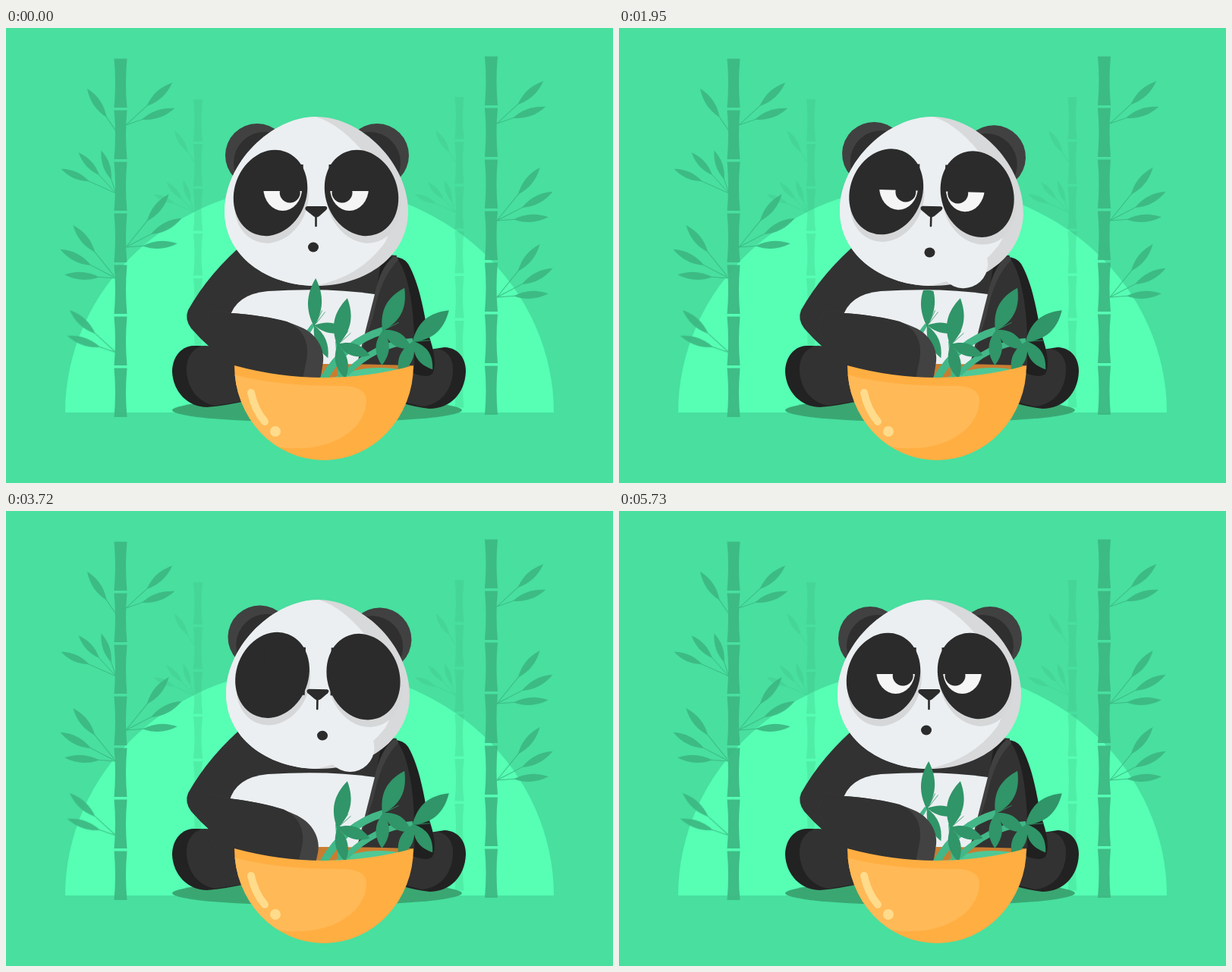
Animation of 800x600 px, one loop 5760 ms. Source, as an HTML page:

```html
<!DOCTYPE html>
<html lang="en">
<head>
<meta charset="utf-8">
<title>Panda lunch</title>
<style>
html, body { margin: 0; width: 100%; height: 100%; overflow: hidden; background: #48df9f; }
svg { display: block; width: 100vw; height: 100vh; }
</style>
</head>
<body>
<svg viewBox="0 0 800 600">
  <defs>
    <path id="skull" d="M409 117C468 117 530 178 530 242C530 300 475 340 409 340C343 340 288 300 288 242C288 178 350 117 409 117Z"/>
    <clipPath id="inSkull"><use href="#skull"/></clipPath>
    <path id="bowl" d="M301 445Q360 461 418 461Q478 461 537 445A118 125 0 0 1 301 445Z"/>
    <clipPath id="inBowl"><use href="#bowl"/></clipPath>
    <clipPath id="aboveBowl"><rect width="800" height="460"/></clipPath>
    <clipPath id="bite"><path id="biteEdge" d="M300 350H390Q405 341 422 350H480V700H300Z"/></clipPath>
    <g id="patch"><ellipse rx="47.4" ry="57.8" transform="rotate(20)"/></g>
    <g id="eye">
      <ellipse cy="211" rx="25.5" ry="30" fill="#f5f5f5"/>
      <circle cx="9.5" cy="217" r="13.5" fill="#2b2b2b"/>
      <path id="lid" fill="#2b2b2b"/>
    </g>
  </defs>

  <rect width="800" height="600" fill="#48df9f"/>
  <path d="M78 507A322 300 0 0 1 722 507Z" fill="#56ffb4"/>
  <g id="forest" fill="#3cb882"></g>
  <ellipse cx="410" cy="504" rx="191" ry="16" fill="#3aa772"/>

  <!-- feet -->
  <path d="M247 419C229 420 219 436 219 453C220 480 240 500 265 500Q290 498 320 491V430Q285 418 247 419Z" fill="#222"/>
  <path d="M262 419C245 421 237 436 238 453C240 478 255 494 275 498L320 491V425Z" fill="#323232"/>
  <path d="M578 421C597 422 606 436 606 453C605 482 585 502 558 502Q540 500 520 494V430Z" fill="#222"/>
  <path d="M568 423C583 425 590 438 589 453C588 478 572 497 548 499L520 492V435Z" fill="#323232"/>

  <!-- torso -->
  <path d="M318 280Q268 322 240 372Q235 384 244 396Q268 424 302 446H500L515 300Z" fill="#323232"/>
  <path d="M495 305Q520 297 530 311C545 337 551 375 556 402Q570 440 562 456Q552 464 525 450H470Z" fill="#202020"/>
  <path d="M486 350Q494 315 514 302C528 318 541 365 538 450H462Z" fill="#323232"/>
  <path d="M486 350Q494 315 510 302Q516 301 517 306Q494 328 484 380L462 446Z" fill="#404040"/>
  <path d="M294 384Q302 351 345 347Q425 342 486 351L462 446H330Z" fill="#ebeff1"/>

  <g id="head">
    <g fill="#414141"><circle cx="331" cy="168" r="42"/><circle cx="489" cy="168" r="42"/></g>
    <g fill="#2f2f2f"><circle cx="341" cy="178" r="41"/><circle cx="479" cy="178" r="41"/></g>
    <use href="#skull" fill="#d8d9da"/>
    <path d="M404 116Q440 124 478 172C500 200 518 255 498 285Q462 333 395 342H280V110Z" fill="#ebeff1" clip-path="url(#inSkull)"/>
    <circle id="cheek" fill="#ebeff1"/>
    <g clip-path="url(#inSkull)" fill="#d6d7d8">
      <use href="#patch" transform="translate(350 227)"/>
      <use href="#patch" transform="translate(471 227) scale(-1 1)"/>
    </g>
    <g fill="#2b2b2b">
      <use href="#patch" transform="translate(348.5 217.5)"/>
      <use href="#patch" transform="translate(468.5 217.5) scale(-1 1)"/>
      <path d="M397 235H421Q425 236 422 240L413 248Q409 251 405 248L395 240Q393 236 397 235Z"/>
      <path d="M408.5 248V261" stroke="#2b2b2b" stroke-width="2.6" stroke-linecap="round"/>
      <ellipse id="mouth"/>
    </g>
    <use href="#eye" x="364.7"/>
    <use href="#eye" transform="translate(452.5) scale(-1 1)"/>
  </g>

  <path d="M301 445Q419 441 537 445Q478 461 418 461Q360 461 301 445Z" fill="#c97d31"/>
  <g clip-path="url(#aboveBowl)"><g id="twig"><g id="sprout" clip-path="url(#bite)" fill="#309568">
    <path d="M403 390Q378 422 370 452L352 505H364L379 455Q388 420 407 392Z" fill="#43b787"/>
  </g></g></g>
  <g id="arm">
    <path d="M270 371L297 376C340 379 372 386 392 396C412 406 420 426 418 440L412 478H300Q275 425 262 395Z" fill="#424242"/>
    <path d="M270 371L297 376C325 378 352 382 370 387C394 397 400 418 396 438L388 478H300Q275 425 262 395Z" fill="#323232"/>
  </g>
  <g id="salad" fill="#309568">
    <path d="M425 465Q470 440 528 452L510 465Z" fill="#4fc896"/>
    <g fill="none" stroke="#43b787">
      <path d="M536 413Q488 416 448 456" stroke-width="8"/>
      <path d="M497 399Q446 414 418 464" stroke-width="10"/>
      <path d="M437 413L441 464" stroke-width="6"/>
    </g>
  </g>

  <use href="#bowl" fill="#ffae42"/>
  <path d="M300 457Q360 473 448 472Q476 474 475 493C473 530 430 555 385 554Q365 555 345 550Q300 515 300 457Z" fill="#ffb956" clip-path="url(#inBowl)"/>
  <path d="M323 481Q328 504 341 519" fill="none" stroke="#ffdb8c" stroke-width="10" stroke-linecap="round"/>
  <circle cx="355" cy="532" r="7" fill="#ffdb8c"/>
</svg>

<script>
const LOOP = 5760;
const $ = id => document.getElementById(id);
const add = (id, markup) => $(id).insertAdjacentHTML('beforeend', markup);
const set = (id, attrs) => {
  for (const name in attrs) $(id).setAttribute(name, attrs[name]);
};

// Pointed leaf along a ray at the given angle, between two distances
function leaf(angle, from, to, width) {
  const a = from + (to - from) * 0.35, b = from + (to - from) * 0.65, w = width * 0.67;
  return `<path transform="rotate(${angle})" d="M${from} 0C${a} ${w} ${b} ${w} ${to} 0C${b} ${-w} ${a} ${-w} ${from} 0Z"/>`;
}

// Twig on a bamboo trunk with one to three leaves; dir -1 points left
function sprig(x, y, dir, count, turn = 0, size = 1, flip = 1) {
  let parts = '';
  for (let i = 3 - count; i < 3; i++) {
    const angle = -51 + 23.5 * i, reach = 90 - 3 * i - 4 * i * i;
    parts += leaf(angle, reach - 46, reach, 10);
    parts += `<path transform="rotate(${angle})" d="M0 0H${reach - 40}" stroke="#3cb882"/>`;
  }
  return `<g transform="translate(${x} ${y}) scale(${dir * size} ${size}) rotate(${turn}) scale(1 ${flip})">${parts}</g>`;
}

function bamboo(x, top, width, step, opacity, sprigs) {
  let d = '';
  const h = step - 3.5, r = width / 2;
  for (let i = 0; i < 7; i++) {
    const y = top + i * step;
    d += `M${x - r} ${y}H${x + r}Q${x + r - 3} ${y + h / 2} ${x + r} ${y + h}H${x - r}Q${x - r + 3} ${y + h / 2} ${x - r} ${y}Z`;
  }
  add('forest', `<g opacity="${opacity}"><path d="${d}"/>${sprigs}</g>`);
}

for (const [x, top] of [[253, 94], [597.5, 91]])
  bamboo(x, top, 12, 59, 0.25, sprig(x - 5, 177, -1, 1, -54, 0.72) + sprig(x - 5, 243, -1, 3, -75, 0.65, -1));
bamboo(151, 40.5, 17, 68, 0.92,
  sprig(145, 136, -1, 1, -52) + sprig(158, 128, 1, 2, -15) + sprig(145, 218, -1, 3, -75, 0.88, -1) +
  sprig(158, 289, 1, 3) + sprig(145, 330, -1, 3) + sprig(145, 428, -1, 2, -15));
bamboo(639.5, 37.5, 17, 68, 0.92,
  sprig(647, 126, 1, 2, -15) + sprig(647, 254, 1, 3) + sprig(647, 355, 1, 3));

// Shoot with one long leaf ahead and two shorter ones folded back
function shoot(id, x, y, turn, width) {
  add(id, `<g transform="translate(${x} ${y}) rotate(${turn})">
    ${leaf(0, -2, 62, width)}${leaf(97, 0, 45, width * 0.75)}${leaf(155, 0, 47, width * 0.75)}
    <path d="M2 2L20 10M3 3L18 14" stroke="#309568" stroke-width="0.8"/></g>`);
}

shoot('sprout', 406, 392, -88, 18);
shoot('salad', 437, 417, -78, 21);
shoot('salad', 497, 398, -63, 23);
shoot('salad', 537, 413, -41, 23);

// Smooth change from 0 to 1 between two times
function step(t, from, to) {
  const p = Math.min(1, Math.max(0, (t - from) / (to - from)));
  return p * p * (3 - 2 * p);
}
const pulse = (t, a, b, c, d) => step(t, a, b) - step(t, c, d);
const wave = (t, peak, period) => Math.cos((t - peak) / period * 2 * Math.PI);

// Eyelid: 0 half open, 1 shut, negative wide open
function lid(v) {
  const end = Math.max(180, 215 + 28 * v ** 3), mid = Math.max(180, 215 + 28 * v);
  return `M-27 180V${end}Q0 ${2 * mid - end} 27 ${end}V180Z`;
}

function draw(t) {
  const tilt = -1.6 * wave(Math.min(t, 3250), 1340, 1275) * pulse(t, 780, 1340, 3250, 4500);
  set('head', { transform: `rotate(${tilt} 410 350)` });

  const wide = pulse(t, 200, 550, 900, 1200);
  const shut = pulse(t, 900, 1250, 1300, 1450) + pulse(t, 3400, 3640, 3850, 4380);
  set('lid', { d: lid(shut - 1.25 * wide) });

  const chew = pulse(t, 1400, 1700, 5540, 5730);
  const open = 7 + 6 * pulse(t, 450, 900, 1420, 1680);
  set('mouth', {
    cx: 405 + chew * 5.5 * (1 + wave(t, 3720, 760)),
    cy: 289 + 7 * chew,
    rx: open,
    ry: open * 0.92
  });

  set('cheek', {
    cx: 448 + 5 * wave(t, 1950, 600),
    cy: 310 - 4 * wave(t, 2100, 600),
    r: 32 * pulse(t, 1420, 1780, 4950, 5720)
  });

  const lift = pulse(t, 500, 900, 900, 1340) - 1.2 * pulse(t, 3200, 3600, 3600, 4000) + pulse(t, 3800, 4120, 4160, 4350);
  set('arm', { transform: `translate(${4 * lift} ${-lift}) rotate(${-3 * lift} 255 385)` });

  const rise = 135 * pulse(t, 2000, 2480, 3740, 4200) - 59 * pulse(t, 180, 1150, 1400, 1930);
  const bitten = t > 1300 && t < 3000;
  set('twig', { transform: `translate(0 ${rise})` });
  set('biteEdge', { transform: `translate(0 ${bitten ? 0 : -59 - rise})` });
}

function tick() {
  draw(performance.now() % LOOP);
  requestAnimationFrame(tick);
}
tick();
</script>
</body>
</html>
```
